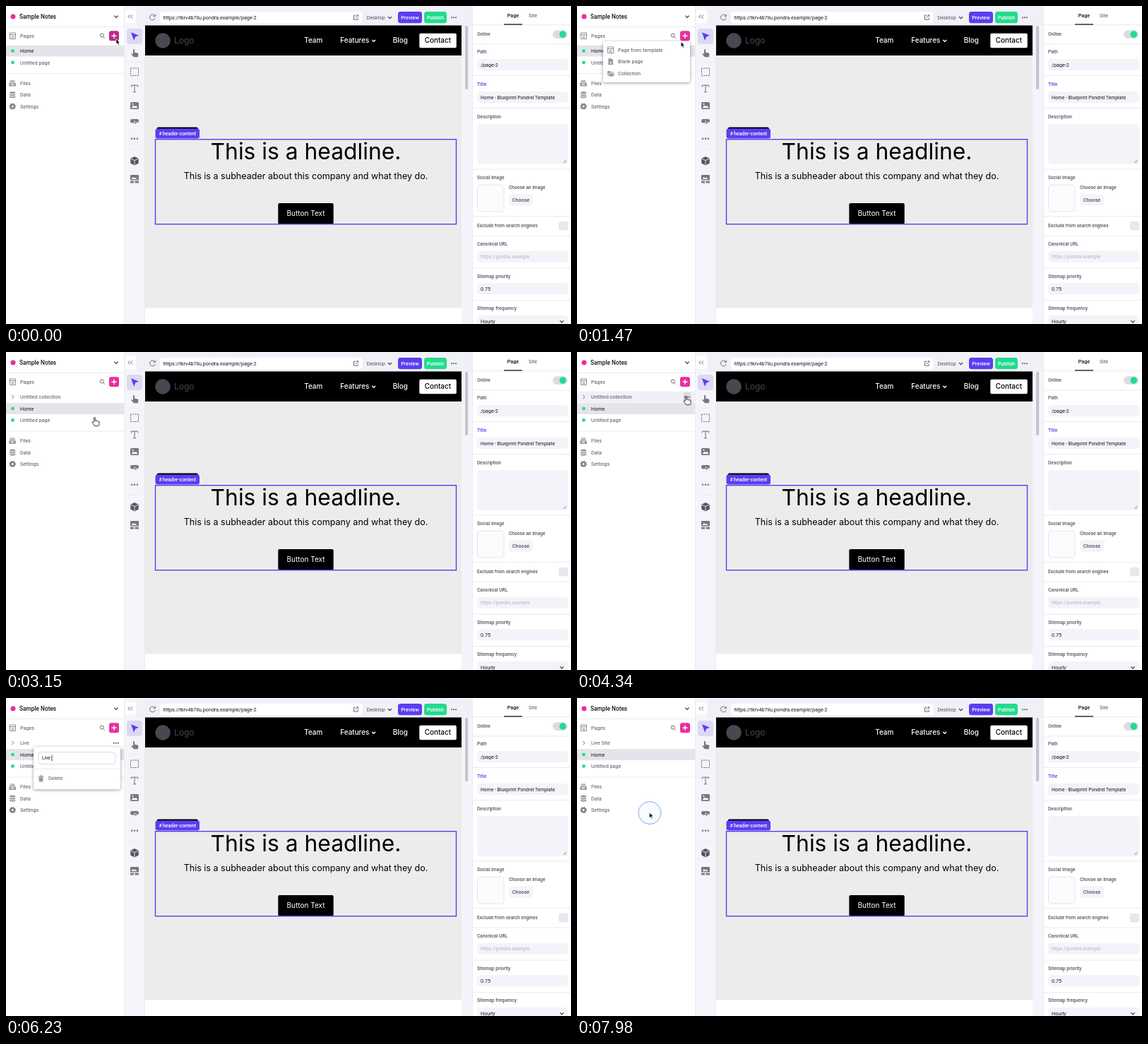
An HTML page that plays this animation: 800x450 px, repeating every 8 s.

```html
<!DOCTYPE html>
<html lang="en">
<head>
<meta charset="utf-8">
<title>Page builder</title>
<style>
html, body { margin: 0; width: 100%; height: 100%; overflow: hidden; background: #fff; }
svg { display: block; width: 800px; height: 450px; font: 7.2px Roboto, sans-serif; fill: #55555f; }
text { white-space: pre; }
.site { font-family: Inter, sans-serif; }
.mid { text-anchor: middle; }
.med { font-weight: 500; }
.label { font-size: 6.65px; font-weight: 500; }
.ink { fill: #16161c; }
.white { fill: #fff; }
.pale { fill: #f3f3f9; }
.violet { fill: #5c3df0; }
.line { fill: none; stroke: #ebebf1; }
.icon { fill: none; stroke: #6c6c75; stroke-width: 1; }
.solid { fill: #777780; }
.soft { opacity: .75; }
.float { filter: drop-shadow(0 1px 2px #0006); }

/* hard switches and eased motion share one 8 s clock */
.step { animation: 8s step-end infinite; }
#list { animation-name: shift; }
#folder { animation-name: folder; }
#plus { animation-name: plus; }
#files { animation-name: files; }
#menu { animation-name: menu; }
#pick { animation-name: pick; }
#rowHover { animation-name: row; }
#more { animation-name: more; }
#moreBox { animation-name: moreBox; }
#popup { animation-name: popup; }
#select { animation-name: select; }
#caret { animation-name: caret; }
#show { animation-name: show; }
#arrow { animation-name: arrow; }
#hand { animation-name: hand; }
#cursor { animation: move 8s ease-in-out infinite; }
#ring { animation: ring 8s linear infinite; }
@keyframes shift { 0% { transform: none } 36.75% { transform: translateY(16.5px) } }
@keyframes folder { 0% { opacity: 0 } 36.75% { opacity: 1 } }
@keyframes plus { 0%, 12.25% { fill: #c2268b } 2.6%, 17% { fill: #ea2d9f } }
@keyframes files { 0%, 12.25% { opacity: 0 } 4.37% { opacity: 1 } }
@keyframes menu { 0%, 36.75% { opacity: 0 } 13.1% { opacity: 1 } }
@keyframes pick {
  0% { opacity: 0; transform: none }
  19.2% { opacity: 1; transform: none }
  21% { opacity: 1; transform: translateY(16.5px) }
  22.7% { opacity: 1; transform: translateY(33.5px) }
}
@keyframes row { 0%, 57.75% { opacity: 0 } 46.3% { opacity: 1 } }
@keyframes more { 0%, 98.8% { opacity: 0 } 46.3% { opacity: 1 } }
@keyframes moreBox { 0%, 57.75% { opacity: 0 } 48.1% { opacity: 1 } }
@keyframes popup { 0%, 98.8% { opacity: 0 } 57.75% { opacity: 1 } }
@keyframes select { 0%, 70.87% { opacity: 0 } 65.6% { opacity: 1 } }
@keyframes caret { 0% { opacity: 0 } 70.87% { opacity: 1 } }
@keyframes show { 0%, 90.1% { opacity: 1 } 70.87% { opacity: 0 } }
@keyframes arrow { 0%, 59.5% { opacity: 1 } 18.4% { opacity: 0 } }
@keyframes hand { 0%, 59.5% { opacity: 0 } 18.4% { opacity: 1 } }
@keyframes move {
  0%, .8% { transform: translate(156px, 46.5px) }
  2.6%, 5.3% { transform: translate(141px, 112px) }
  10.5%, 16.6% { transform: translate(149.5px, 46px) }
  24.5%, 35% { transform: translate(127.5px, 88.5px) }
  37.6%, 42.8% { transform: translate(125.5px, 92.5px) }
  48.1%, 57% { transform: translate(154.5px, 62.5px) }
  62.1%, 90.1% { transform: translate(100px, 84px) }
  94.5%, 100% { transform: translate(102.5px, 162px) }
}
@keyframes ring {
  0%, 9.6%, 30.6%, 55%, 96.2% { opacity: 0; transform: scale(.4) }
  11%, 12.6%, 32%, 33.4%, 56.2%, 57%, 97.6%, 100% { opacity: 1; transform: none }
  14.5%, 35%, 58.5% { opacity: 0; transform: none }
  14.6%, 35.1%, 58.6% { opacity: 0; transform: scale(.4) }
}
</style>
</head>
<body>
<svg viewBox="0 0 800 450">
  <defs>
    <path id="chev" d="M-2.6-1.3 0 1.3 2.6-1.3" fill="none" stroke="#33333b" stroke-width="1.2"/>
    <g id="dots"><circle cx="-3" r="1"/><circle r="1"/><circle cx="3" r="1"/></g>
    <path id="doc" class="icon soft" d="M-4-4.3h8v8.6h-8zM-4-1.8h8M-2 .6h4M-2 2.5h4"/>
    <g id="photo"><rect x="-6" y="-5" width="12" height="10" rx="1.5"/><path class="white" d="M-4.5 3.2-1.5-.6.6 1.6 2-.2l2.6 3.4z"/><circle class="white" cx="-2.6" cy="-2.2" r="1"/></g>
  </defs>

  <!-- left panel -->
  <rect width="168" height="450" fill="#fff"/>
  <path class="line" d="M0 29.5H168"/>
  <circle cx="10" cy="15" r="3.5" fill="#ea2d9f"/>
  <text class="ink med" x="19" y="17.8" font-size="8.3">Sample Notes</text>
  <use href="#chev" x="156" y="15"/>
  <use href="#doc" x="9.5" y="42.3"/>
  <text x="20" y="44.8">Pages</text>
  <circle class="icon" cx="135.8" cy="41.6" r="2.5"/><path class="icon" d="m137.7 43.5 2.1 2.1"/>
  <rect id="plus" class="step" x="146" y="35.2" width="14" height="14" rx="3"/>
  <path d="M149.5 42.2h7M153 38.7v7" stroke="#fff" stroke-width="1.4"/>

  <g id="folder" class="step">
    <rect id="rowHover" class="step" y="55.7" width="167.5" height="16" fill="#f0f0f6"/>
    <path class="icon" d="m8.3 60.9 2.7 2.7-2.7 2.7"/>
    <text id="name" x="20" y="66.1">Untitled collection</text>
    <g id="more" class="step">
      <rect id="moreBox" class="step" x="150.5" y="57" width="11.5" height="13" rx="2" fill="#dddde6"/>
      <use href="#dots" x="155.8" y="63.8"/>
    </g>
  </g>
  <g id="list" class="step">
    <rect y="55.7" width="167.5" height="15.8" fill="#e4e4ea"/>
    <circle cx="9.5" cy="63.6" r="2.4" fill="#20dd8d"/>
    <text class="ink" x="20" y="66.1">Home</text>
    <circle cx="9.5" cy="80" r="2.4" fill="#20dd8d"/>
    <text x="20" y="82.6">Untitled page</text>
    <path class="line" d="M0 95.5H167.5"/>
    <rect id="files" class="step pale" y="101" width="167.5" height="16"/>
    <g class="solid soft">
      <path d="M6 105h6v1.2H6zM5 107h8v1.2H5zM4.3 109h9.6v4.6H4.3z"/><path class="white" d="M7.3 110.3h3.6v1.5H7.3z"/>
      <ellipse cx="9.2" cy="122.6" rx="4.1" ry="1.7"/><path d="M5.1 124.2q4.1 2 8.2 0v2q-4.1 2-8.2 0zM5.1 127.2q4.1 2 8.2 0v2q-4.1 2-8.2 0z"/>
    </g>
    <text x="20" y="111.5">Files</text>
    <text x="20" y="128.1">Data</text>
    <g fill="none" stroke="#777780">
      <circle cx="9.2" cy="142" r="2.6" stroke-width="2"/>
      <circle cx="9.2" cy="142" r="4.1" stroke-width="1.3" stroke-dasharray="1.7 1.52"/>
    </g>
    <text x="20" y="144.6">Settings</text>
  </g>

  <!-- tool strip -->
  <rect x="168" width="29" height="450" fill="#f4f4fa"/>
  <path class="line" d="M167.5 0V450M196.5 28V450" stroke="#e2e2ea"/>
  <rect x="169" y="6" width="15" height="18" rx="3" fill="#fff"/>
  <path class="icon" d="m175.3 12.4-2.6 2.6 2.6 2.6M179 12.4l-2.6 2.6 2.6 2.6"/>
  <rect x="171" y="32" width="22" height="22" rx="4" fill="#dcdaf2"/>
  <path class="violet" d="m177 37.3 11 4.4-4.7 1.9-2.2 5.2z"/>
  <path class="solid" d="M180 61.5q1.2-1.3 2 .2v4l4.4.9q1.2.4 1 1.8l-.6 3.8H181l-3.8-4.3q.6-1.2 2.8.1z"/>
  <path class="line" d="M174 79.5h16M174 202.5h16" stroke="#d9d9e2"/>
  <rect class="icon" x="176.5" y="88" width="11" height="10.5" stroke-dasharray="2 1.1"/>
  <path class="icon" d="M177.4 114.5v-2.3h9.2v2.3M182 112.2v9.4M180 121.8h4" stroke-width="1.5"/>
  <g class="solid">
    <use href="#photo" x="182" y="141"/>
    <rect x="176" y="160" width="12" height="5.5" rx="2.4"/>
    <path d="m181.5 162.5 5 2.5-2.2.8-.9 2.6z" stroke="#f4f4fa" stroke-width=".6"/>
    <use href="#dots" transform="translate(182 187.7) scale(1.3)"/>
  </g>
  <path d="m182 213 5.7 2.8v6.7l-5.7 2.9-5.7-2.9v-6.7z"/>
  <path d="m176.7 216 5.3 2.6 5.3-2.6M182 218.6v6.4" fill="none" stroke="#f4f4fa" stroke-width=".9"/>
  <g class="solid"><rect x="176" y="239" width="12" height="7.5" rx="1"/><path class="white" d="m177.5 245 2.3-3 2 2 1.2-1.4 2.5 2.4z"/><path d="M176 247.8h5v2.8h-5zM182.5 247.8h5.5v2.8h-5.5z"/></g>

  <!-- top bar -->
  <rect x="185" width="475" height="28" fill="#f0f0f7"/>
  <rect x="645" y="28" width="15" height="422" fill="#f4f4fa"/>
  <path class="icon" d="M210.5 13.6a3.9 3.9 0 1 0 .7 3.5M211.4 11.8v2.7h-2.8" stroke-width="1.2"/>
  <rect x="218" y="8" width="286.5" height="16.5" rx="4" fill="#fff"/>
  <text class="ink" x="222.5" y="18.7" font-size="7.15">https://tkrv4b7ilu.pondra.example/page-2</text>
  <path class="icon" d="M495 13.3h-2.6v6h5.8v-2.7M494.5 17.2l3.7-4M496.2 12.8h2.4v2.4"/>
  <text x="510.5" y="18.7">Desktop</text>
  <use href="#chev" x="543.5" y="16.4"/>
  <rect class="violet" x="555" y="8" width="34" height="16.2" rx="3.5"/>
  <rect x="592" y="8" width="32" height="16.2" rx="3.5" fill="#22dc8e"/>
  <g class="white med mid"><text x="572" y="18.7">Preview</text><text x="608" y="18.7">Publish</text></g>
  <use href="#dots" x="634" y="16.2"/>

  <!-- page being edited -->
  <g class="site">
    <rect x="197" y="27.5" width="448" height="42.5" fill="#000"/>
    <rect x="197" y="70" width="448" height="357" fill="#ececec"/>
    <rect x="198" y="427" width="447" height="23" fill="#fff"/>
    <circle cx="222" cy="49" r="10.7" fill="#474850"/>
    <text x="238" y="53" font-size="12" fill="#474850">Logo</text>
    <g class="white med" font-size="9.9">
      <text x="422.3" y="52.4">Team</text>
      <text x="473.3" y="52.4">Features</text>
      <path d="m518.3 48 2.4 2.3 2.4-2.3" fill="none" stroke="#fff" stroke-width="1.4"/>
      <text x="547.8" y="52.4">Blog</text>
      <rect x="585.3" y="38.8" width="52.5" height="20.5" rx="2"/>
    </g>
    <rect x="213.5" y="171.5" width="58.5" height="8" rx="2.5" fill="#000"/>
    <g class="mid" fill="#000">
      <text class="med" x="611.4" y="52.4" font-size="9.9">Contact</text>
      <text x="424.5" y="217" font-size="31.8">This is a headline.</text>
      <text x="424.5" y="244.8" font-size="12.55">This is a subheader about this company and what they do.</text>
      <rect x="385.3" y="279" width="78.4" height="29.5" rx="2"/>
      <text class="white" x="424.5" y="297.2" font-size="10.05">Button Text</text>
    </g>
  </g>
  <rect x="211.5" y="188.7" width="426" height="120" fill="none" stroke="#5c3df0" stroke-width="1.4"/>
  <rect class="violet" x="211.5" y="173.5" width="62.5" height="14" rx="3"/>
  <g class="white med" font-size="6.9"><text x="216.5" y="183">#</text><text x="222" y="183">header-content</text></g>
  <rect x="650" y="28" width="4.2" height="90" rx="2" fill="#c4c4ca"/>

  <!-- right panel -->
  <rect x="660" width="140" height="450" fill="#fff"/>
  <path class="line" d="M660.5 0V450" stroke="#e0e0e8"/>
  <path class="line" d="M661 26.7H800M661 54H800M661 98.5H800M661 144.5H800M661 231H800M661 297.5H800M661 325H800M661 371H800M661 416.5H800"/>
  <text class="ink mid med" x="718" y="16">Page</text>
  <text class="mid" x="746" y="16">Site</text>
  <rect x="705" y="25.3" width="26" height="1.5" fill="#33333c"/>
  <g class="label">
    <text x="667" y="42">Online</text>
    <text x="667" y="67.4">Path</text>
    <text class="violet" x="667" y="113.2">Title</text>
    <text x="667" y="159">Description</text>
    <text x="667" y="245.2">Social Image</text>
    <text x="712" y="259.3">Choose an image</text>
    <text x="667" y="313.3">Exclude from search engines</text>
    <text x="667" y="339.2">Canonical URL</text>
    <text x="667" y="384.8">Sitemap priority</text>
    <text x="667" y="430.4">Sitemap frequency</text>
  </g>
  <rect x="774" y="34.3" width="21" height="11.6" rx="5.8" fill="#dcdce6"/>
  <circle cx="788.3" cy="40.1" r="4.8" fill="#20dd8d"/>
  <g class="pale">
    <rect x="667" y="75" width="129" height="16.3" rx="5"/>
    <rect x="667" y="121" width="129" height="16.3" rx="5"/>
    <rect x="667" y="167" width="129" height="57" rx="5"/>
    <rect x="712" y="266.3" width="34" height="16.5" rx="5"/>
    <rect x="667" y="346.5" width="129" height="16.3" rx="5"/>
    <rect x="667" y="392" width="129" height="16.3" rx="5"/>
    <rect x="667" y="438" width="129" height="16.3" rx="5"/>
  </g>
  <path class="icon soft" d="m789 222 4.2-4.2M791.5 222.2l1.8-1.8"/>
  <rect x="667.5" y="253.3" width="37.5" height="37.5" rx="4" fill="#fcfcfe" stroke="#d2d2dc" stroke-dasharray="2 1.6"/>
  <rect x="783.3" y="305.3" width="12" height="11.5" rx="2" fill="#e8e8f0" stroke="#dadae4" stroke-width=".7"/>
  <g class="ink">
    <text x="672" y="85.7">/page-2</text>
    <text x="672" y="131.5" font-size="6.8">Home - Blueprint Pondrel Template</text>
    <text x="672" y="402.7">0.75</text>
    <text x="672" y="448.6">Hourly</text>
  </g>
  <text class="mid med" x="729" y="277">Choose</text>
  <text x="672" y="357" fill="#b4b4be" font-size="6.7">https://pondra.example</text>
  <use href="#chev" x="787" y="446.5"/>

  <!-- add menu -->
  <g id="menu" class="step">
    <rect class="float" x="37" y="50" width="123" height="58" rx="3" fill="#fff"/>
    <rect id="pick" class="step pale" x="37" y="54" width="123" height="16.5"/>
    <use href="#doc" x="47.5" y="62.3"/>
    <g class="solid soft">
      <path d="M44.3 74.2h4.2l2.6 2.6v6.4h-6.8z"/><path class="white" d="M46 79h3.4v.8H46zM46 80.8h3.4v.8H46z"/>
      <path d="M43.2 92h3.4l1 1.2h4v1.4h-6l-1.4 3.6h-1zM46 95.4h7l-1.5 4h-7z"/>
    </g>
    <text x="58" y="64.6">Page from template</text>
    <text x="58" y="81.2">Blank page</text>
    <text x="58" y="97.9">Collection</text>
  </g>

  <!-- rename popup -->
  <g id="popup" class="step">
    <rect class="float" x="39" y="69.3" width="123" height="60" rx="3" fill="#fff"/>
    <rect x="46" y="76.5" width="109" height="17" rx="4" fill="#fff" stroke="#dcdce4"/>
    <rect id="select" class="step" x="51" y="80.5" width="53" height="9" fill="#b5d5fe"/>
    <text id="field" class="ink" x="51" y="87.3" font-size="6.65">Untitled collection</text>
    <rect id="caret" class="step ink" y="80.7" width=".8" height="8.6"/>
    <path class="line" d="M39 100H162"/>
    <path class="solid soft" d="M45.8 110.6h7.4v1.1h-7.4zM48 109.4h3v1h-3zM46.4 112.3h6.2l-.4 6.2h-5.4z"/>
    <text x="60" y="116.3">Delete</text>
  </g>

  <!-- pointer -->
  <g id="cursor">
    <circle id="ring" cx=".5" cy=".5" r="16" fill="#76a5ef0c" stroke="#79a2ea"/>
    <g id="show" class="step">
      <path id="arrow" class="step" d="M0 0v7.6l1.8-1.5 1.3 2.8 1.3-.6-1.3-2.7 2.4-.2z" fill="#000" stroke="#fff" stroke-width=".7"/>
      <path id="hand" class="step" d="M-1 6.8V1q0-1 1-1t1 1v4q1.3-.8 2 .3 1.4-.7 2 .5 1.6-.4 1.6 1.2v2.2q0 1.3-1 2.8H0L-3.4 7.7q-.2-1.5 1.2-1.3z" fill="#fff" stroke="#222" stroke-width="1"/>
    </g>
  </g>
</svg>
<script>
const LOOP = 8000;
const keyTimes = [5670, 5880, 5950, 6090, 6230, 6370, 6510, 6650, 6860];
const [name, field, caret] = ['name', 'field', 'caret'].map(id => document.getElementById(id));
let start;

function tick(now) {
  start ??= now;
  const t = (now - start) % LOOP;
  const typed = keyTimes.filter(k => k <= t).length;
  const value = typed ? 'Live Site'.slice(0, typed) : 'Untitled collection';
  if (field.textContent !== value) name.textContent = field.textContent = value;
  caret.setAttribute('x', 51 + field.getComputedTextLength());
  requestAnimationFrame(tick);
}
requestAnimationFrame(tick);
</script>
</body>
</html>
```
